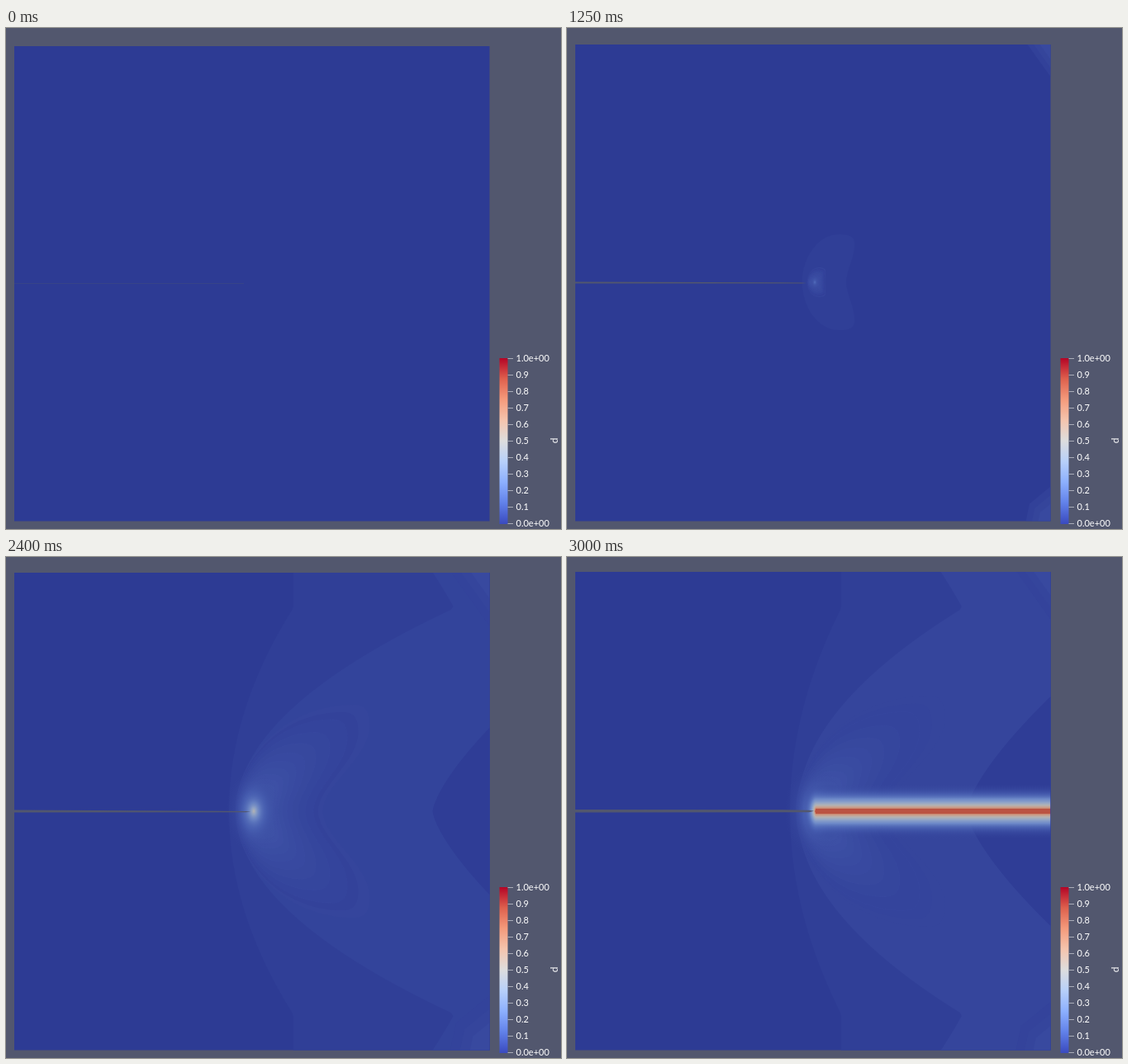
These frames come from a looping animation (672x607 px, 3.25 s). An HTML page with a canvas:

```html
<!DOCTYPE html>
<html lang="en">
<head>
<meta charset="utf-8">
<title>Damage field d</title>
<style>
html, body { margin: 0; width: 100%; height: 100%; overflow: hidden; background: #52576e; }
canvas { display: block; }
</style>
</head>
<body>
<canvas id="stage" width="672" height="607"></canvas>
<script>
const ctx = document.getElementById('stage').getContext('2d');
const LOOP = 3250, STEP = 50, RUPTURE = 2600;
const LEFT = 10, RIGHT = 585.5, BOTTOM = 597.5, MID = 308, TIP = 298;
const BACK = '#52576e';
const COOL_WARM = [[59, 76, 192], [98, 130, 234], [141, 176, 254], [184, 208, 249], [221, 221, 221],
  [245, 196, 173], [244, 154, 123], [222, 96, 77], [180, 4, 38]];

// Damage value 0..1 to a colour; the plate is shaded darker than the legend
function color(d, alpha = 1, shade = 0.77 + 0.08 * d) {
  const p = Math.min(d, 1) * 8, i = Math.min(7, Math.floor(p));
  const rgb = COOL_WARM[i].map((u, k) => Math.round((u + (COOL_WARM[i + 1][k] - u) * (p - i)) * shade));
  return `rgba(${rgb},${alpha})`;
}

// Piecewise linear value through [time, value] pairs
function key(t, ...pairs) {
  if (t <= pairs[0][0]) return pairs[0][1];
  for (let i = 1; i < pairs.length; i++) {
    const [a, u] = pairs[i - 1], [b, v] = pairs[i];
    if (t <= b) return u + (v - u) * (t - a) / (b - a);
  }
  return pairs[pairs.length - 1][1];
}

function fill(style, alpha = 1) {
  ctx.globalAlpha = alpha;
  ctx.fillStyle = style;
  ctx.fill();
  ctx.globalAlpha = 1;
}

function poly(points) {
  ctx.beginPath();
  points.forEach(([x, y]) => ctx.lineTo(x, y));
  ctx.closePath();
}

// Everything right of the curve x = edge(y - MID)
function region(edge) {
  const points = [[700, 0]];
  for (let y = 0; y <= 608; y += 4) points.push([edge(y - MID), y]);
  poly([...points, [700, 608]]);
}

// Parabola that reaches its width 246 px from the axis, then turns back
const front = (x, width, back) => y => {
  const u = (y / 246) ** 2;
  return x + Math.min(width * u, width - back * (u - 1));
};

// Two-lobed contour around the crack tip with half height h
function kidney(h) {
  const l = TIP - 1.75 * Math.sqrt(h);
  const r = 301 + 0.6 * h + 0.0037 * h * h;
  const n = 301 + 0.64 * h;
  const top = r - Math.min(19, h * 0.45);
  const bend = top - 0.58 * (top - l);
  ctx.beginPath();
  for (const s of [-h, h]) {
    ctx.moveTo(l, MID);
    ctx.bezierCurveTo(l, MID + 0.5 * s, bend, MID + s, top, MID + s);
    ctx.bezierCurveTo(r - 4, MID + s, r, MID + 0.93 * s, r, MID + 0.8 * s);
    ctx.bezierCurveTo(r, MID + 0.5 * s, n, MID + 0.25 * s, n, MID);
  }
}

function drawFronts(t) {
  if (t > 1000) {
    kidney(key(t, [1000, 1], [1250, 58], [1750, 125]));
    fill(color(0.012), key(t, [1000, 0], [1250, 1]));
  }
  region(front(270, key(t, [1750, 146], [2150, 104], [2550, 62]), 0));
  fill(color(0.012), key(t, [1750, 0], [2000, 1]));

  region(front(279, key(t, [2150, 370], [2550, 200]), 68));
  fill(color(0.03), key(t, [1900, 0], [2150, 0.4], [2500, 1]));

  const w = key(t, [1950, 0], [2150, 14], [2550, 102]);
  const h = key(t, [1950, 1], [2150, 38], [2550, 139]);
  region(y => RIGHT - w + w * Math.abs(y / h) ** 1.4);
  fill(color(0.008), w ? 1 : 0);
}

function drawCorners(t) {
  const c = key(t, [1000, 0], [1250, 1], [2150, 1.9], [2550, 1.4]);
  for (let i = 0; i < 3; i++) {
    const w = 30 * c * (1 - i / 4), h = w * 1.4;
    const style = color(0.025 + 0.01 * i);
    poly([[RIGHT - w, 17], [RIGHT, 17], [RIGHT, 17 + h]]);
    fill(style, 0.8);
    poly([[RIGHT - w, BOTTOM], [RIGHT - 0.85 * w, BOTTOM - 0.5 * h], [RIGHT, BOTTOM - h], [RIGHT, BOTTOM]]);
    fill(style, 0.8);
  }
}

function drawRings(t) {
  const h = key(t, [1000, 0], [1250, 18], [1750, 62], [2150, 111], [2550, 140]);
  if (!h) return;
  const soft = key(t, [2150, 1], [2550, 0.15]);
  kidney(h);
  fill(color(0.03));
  kidney(h * 0.93);
  fill(color(0.014), soft);
  for (let i = 1; i < 10; i++) {
    kidney(h * 0.86 ** i);
    fill(color(0.026 + 0.005 * i), 0.75);
    ctx.strokeStyle = color(0.15, 0.1);
    ctx.lineWidth = 0.6;
    ctx.stroke();
  }
}

// Calls add(position, colour) along a profile that fades out near its reach
function profile(reach, fade, damage, add) {
  for (let r = 0; r <= reach; r += 0.5) {
    add(r / reach, color(damage(r), Math.min(1, (reach - r) / fade)));
  }
}

function halo(x, squeeze, reach, fade, damage) {
  const g = ctx.createRadialGradient(0, 0, 0, 0, 0, reach);
  profile(reach, fade, damage, (k, c) => g.addColorStop(k, c));
  ctx.save();
  ctx.translate(x, MID);
  ctx.scale(squeeze, 1);
  ctx.beginPath();
  ctx.arc(0, 0, reach, 0, 7);
  fill(g);
  ctx.restore();
}

function drawGlow(t) {
  if (t <= 1000) return;
  const peak = t < RUPTURE ? key(t, [1000, 0.03], [1250, 0.13], [2150, 0.33], [2550, 0.56]) : 0.35;
  const reach = Math.round(key(t, [1000, 3], [1250, 12], [2150, 42], [2550, 56]));
  halo(300, 0.65, reach, reach, r => 0.03 + peak * Math.exp(-r * 3.6 / reach));
}

// Fully broken core, then exponential decay of the damage
function drawBand() {
  const reach = 33, start = 302;
  const damage = r => r < 3.2 ? 0.87 : Math.exp(-r / 10.5);
  ctx.save();
  ctx.beginPath();
  ctx.rect(0, 0, start, 607);
  ctx.clip();
  halo(start, 0.48, reach, 18, damage);
  ctx.restore();

  const g = ctx.createLinearGradient(0, MID - reach, 0, MID + reach);
  profile(reach, 18, damage, (k, c) => {
    g.addColorStop(0.5 - k / 2, c);
    g.addColorStop(0.5 + k / 2, c);
  });
  ctx.beginPath();
  ctx.rect(start, MID - reach, RIGHT - start, 2 * reach);
  fill(g);
}

function drawCrack(t, gap) {
  const low = 309.5;
  if (t < 300) {
    ctx.beginPath();
    ctx.rect(LEFT, 309, 278, 1);
    fill(BACK, 0.3);
    return;
  }
  const tip = t < RUPTURE ? key(t, [300, 258], [450, 262], [1000, 284], [1250, 290], [2550, 297]) : 299;
  const end = gap * (t < RUPTURE ? 0.6 : 0.92);
  poly([[LEFT, low - gap], [tip - 40, low - end], [tip - 6, low - end * 0.8],
    [tip, low - end * 0.5], [tip - 6, low - end * 0.1], [LEFT, low]]);
  fill(BACK);
}

function drawPlate(t) {
  const gap = key(t, [250, 0.3], [450, 0.75], [750, 0.75], [1250, 1.9], [2300, 2.8], [3000, 3.6]);
  const top = key(t, [450, 22], [750, 21.7], [1250, 20], [2150, 19], [2700, 19], [3000, 18]);
  ctx.save();
  ctx.beginPath();
  ctx.rect(LEFT, top, RIGHT - LEFT, BOTTOM - top);
  ctx.clip();
  ctx.fillStyle = color(0);
  ctx.fillRect(0, 0, 672, 607);
  drawFronts(t);
  drawCorners(t);
  drawRings(t);
  drawGlow(t);
  if (t >= RUPTURE) drawBand();
  drawCrack(t, gap);
  ctx.restore();
}

function drawLegend() {
  const g = ctx.createLinearGradient(0, 600, 0, 400);
  for (let i = 0; i <= 8; i++) g.addColorStop(i / 8, color(i / 8, 1, 1));
  ctx.fillStyle = g;
  ctx.fillRect(597.5, 400, 10, 201);
  ctx.font = '11px Lato, sans-serif';
  ctx.textAlign = 'left';
  for (let i = 0; i <= 10; i++) {
    const y = 600 - 20 * i;
    ctx.fillStyle = '#a9acb8';
    ctx.fillRect(607.5, y, 6.5, 1);
    ctx.fillStyle = '#fff';
    ctx.fillText(i % 10 ? (i / 10).toFixed(1) : `${i / 10}.0e+00`, 617.5, y + 4);
  }
  ctx.save();
  ctx.translate(668, 500);
  ctx.rotate(-Math.PI / 2);
  ctx.textAlign = 'center';
  ctx.font = '12px Lato, sans-serif';
  ctx.fillText('d', 0, 0);
  ctx.restore();
}

function frame() {
  const t = Math.floor((performance.now() % LOOP) / STEP) * STEP;
  ctx.fillStyle = BACK;
  ctx.fillRect(0, 0, 672, 607);
  drawPlate(t);
  drawLegend();
  requestAnimationFrame(frame);
}
frame();
</script>
</body>
</html>
```
